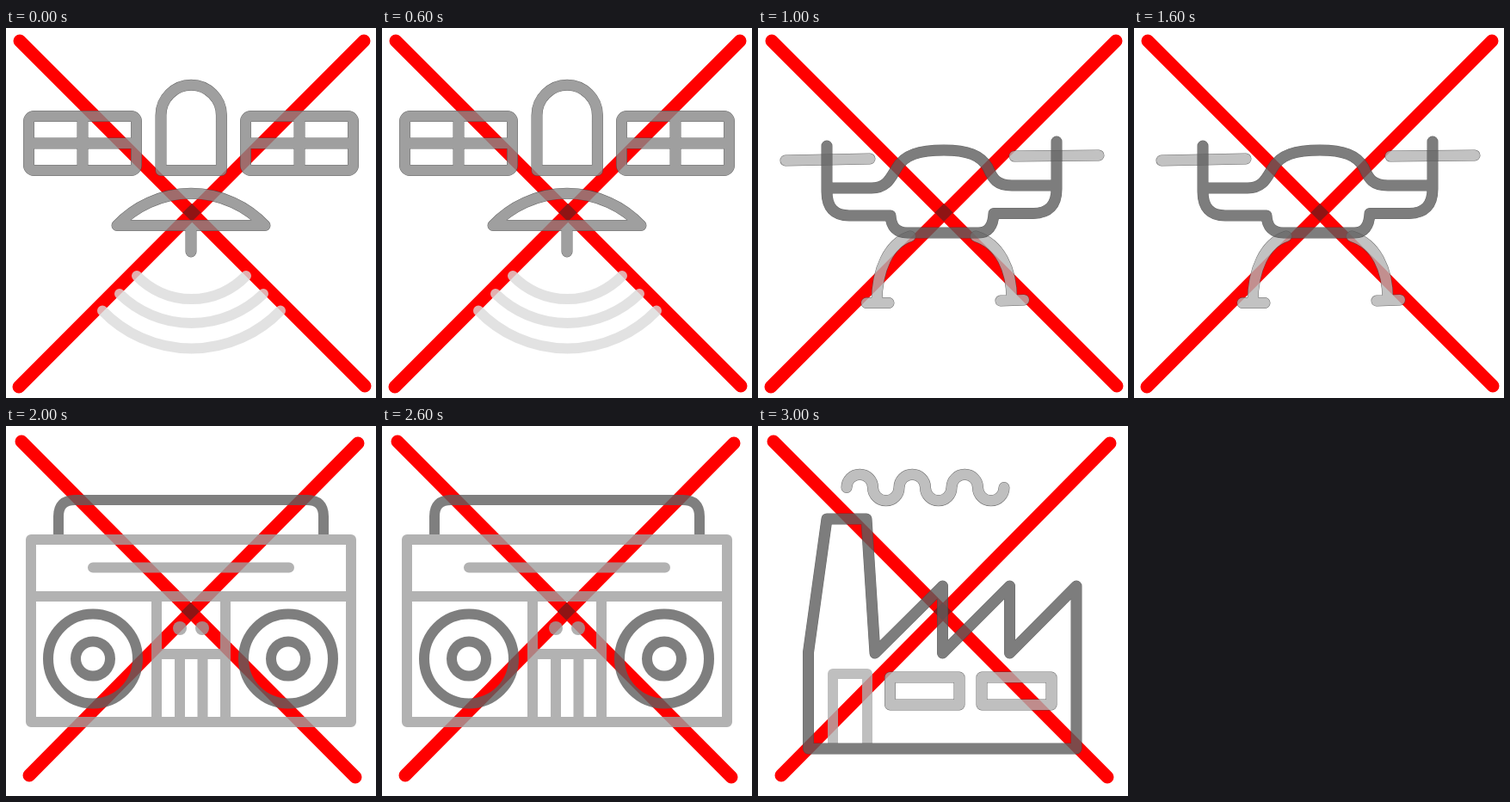
Animation, 430 px wide and 430 px high, one loop 4000 ms. Source, as an HTML page:

```html
<!DOCTYPE html>
<html lang="en">
<head>
<meta charset="utf-8">
<title>Not allowed</title>
<style>
  html, body { margin: 0; width: 100%; height: 100%; overflow: hidden; background: #fff; }
  svg { display: block; width: 100vw; height: 100vh; }
  path { fill: none; stroke-linejoin: round; }
</style>
</head>
<body>
<svg id="stage" viewBox="0 0 430 430"></svg>
<script>
const STEP = 1000;
const ALPHA = 0.8;

// Paint value that shows as the given grey on white once ALPHA is applied.
const grey = v => {
  const c = Math.round((v - 255 * (1 - ALPHA)) / ALPHA);
  return `rgb(${c},${c},${c})`;
};

// One translucent layer of strokes, with an optional thin dark rim.
const layer = (v, d, { rim = false, cap = 'round', width = 12 } = {}) => {
  const line = (color, w) =>
    `<path d="${d}" stroke="${color}" stroke-width="${w}" stroke-linecap="${cap}"/>`;
  return `<g opacity="${ALPHA}">${rim ? line('#444', width + 1) : ''}${line(grey(v), width)}</g>`;
};

const box = (x, y, w, h, r = 0) => r
  ? `M${x + r} ${y}h${w - 2 * r}a${r} ${r} 0 0 1 ${r} ${r}v${h - 2 * r}a${r} ${r} 0 0 1 ${-r} ${r}` +
    `h${2 * r - w}a${r} ${r} 0 0 1 ${-r} ${-r}v${2 * r - h}a${r} ${r} 0 0 1 ${r} ${-r}z`
  : `M${x} ${y}h${w}v${h}h${-w}z`;

const ring = (x, y, r) =>
  `M${x - r} ${y}a${r} ${r} 0 1 1 ${2 * r} 0a${r} ${r} 0 1 1 ${-2 * r} 0z`;

const cross = (a, b, c, d, x, y) =>
  `<path d="M${a}L${b}M${c}L${d}" stroke="#f00" stroke-width="15" stroke-linecap="round"/>` +
  `<rect x="-7.5" y="-7.5" width="15" height="15" fill="#8f1414" transform="translate(${x} ${y}) rotate(45)"/>`;

const wideCross = cross('16 15', '417 416', '416 15', '15 417', 216, 214.5);
const tightCross = cross('18 18', '406 408', '409 20', '27 406', 214.5, 215.5);

const panel = x => box(x, 102.5, 125, 63, 6) + `M${x + 62.5} 103v62M${x} 134h125`;
const speaker = x => ring(x, 270.5, 52) + ring(x, 270.5, 20);

function satellite() {
  const body = 'M180 165.5V101.5a35.2 35.2 0 0 1 70.4 0V165.5z';
  const dish = 'M129 229.5A118 118 0 0 1 301 229.5z';
  const waves = 'M152 288A88 88 0 0 0 279 288' +
    'M132 309A119.5 119.5 0 0 0 299 309M112 328.5A143.7 143.7 0 0 0 319 328.5';
  return wideCross + layer(226, waves) +
    layer(160, panel(26.5) + panel(278.5) + body + dish + 'M215 232V260', { rim: true });
}

function drone() {
  const hull = 'M80 137V190Q80 218 106 218H154Q155 238 174 238H256Q273 238 274 215.5H320Q347 215 347 187V132';
  const roof = 'M80 186H132C150 186 154 174 161 163C170 147 188 142 216 142' +
    'C244 142 259 148 267 162C273 176 278 183 295 183H347';
  const legs = 'M177 242C152 250 138 281 138 319M253 242C281 251 295 280 295 316';
  const ends = 'M126 319.5H152M282 317L309 316M32 154L130 152M298 149L396 148';
  return wideCross + layer(194, legs + ends, { rim: true }) + layer(125, hull + roof, { rim: true });
}

function radio() {
  const handle = 'M61 126V105Q61 86 80 86H350Q369 86 369 105V126';
  const frame = box(29, 132, 372, 212) +
    'M29 198H401M175 198V344M255 198V344M175 265H255M202 265V344M228.5 265V344M101 164.5H329';
  const knob = x => `<circle cx="${x}" cy="235" r="8" fill="${grey(176)}" opacity="${ALPHA}"/>`;
  return tightCross + layer(128, handle, { cap: 'butt' }) + layer(178, frame) +
    knob(202) + knob(228) + layer(126, speaker(101) + speaker(328));
}

function factory() {
  let smoke = 'M103 71.5';
  for (let i = 0; i < 6; i++) smoke += `a15.25 15.25 0 0 ${1 - i % 2} 30.5 0`;
  const door = 'M87 369V288H127V369';
  const windows = box(153.5, 292, 80.5, 32) + box(260, 292, 81, 32);
  const walls = 'M58.5 375V263L80 108H126L136 264L214.5 186V264L292.5 186V264L370 186V375z';
  return tightCross + layer(192, smoke + windows, { rim: true }) +
    layer(192, door, { cap: 'butt' }) + layer(125, walls, { rim: true });
}

const stage = document.getElementById('stage');
stage.innerHTML = [satellite, drone, radio, factory].map(draw => `<g>${draw()}</g>`).join('');
const scenes = [...stage.children];

const start = performance.now();
function show(now) {
  const current = Math.floor(Math.max(0, now - start) / STEP) % scenes.length;
  scenes.forEach((g, i) => g.setAttribute('display', i === current ? 'inline' : 'none'));
  requestAnimationFrame(show);
}
show(start);
</script>
</body>
</html>
```
